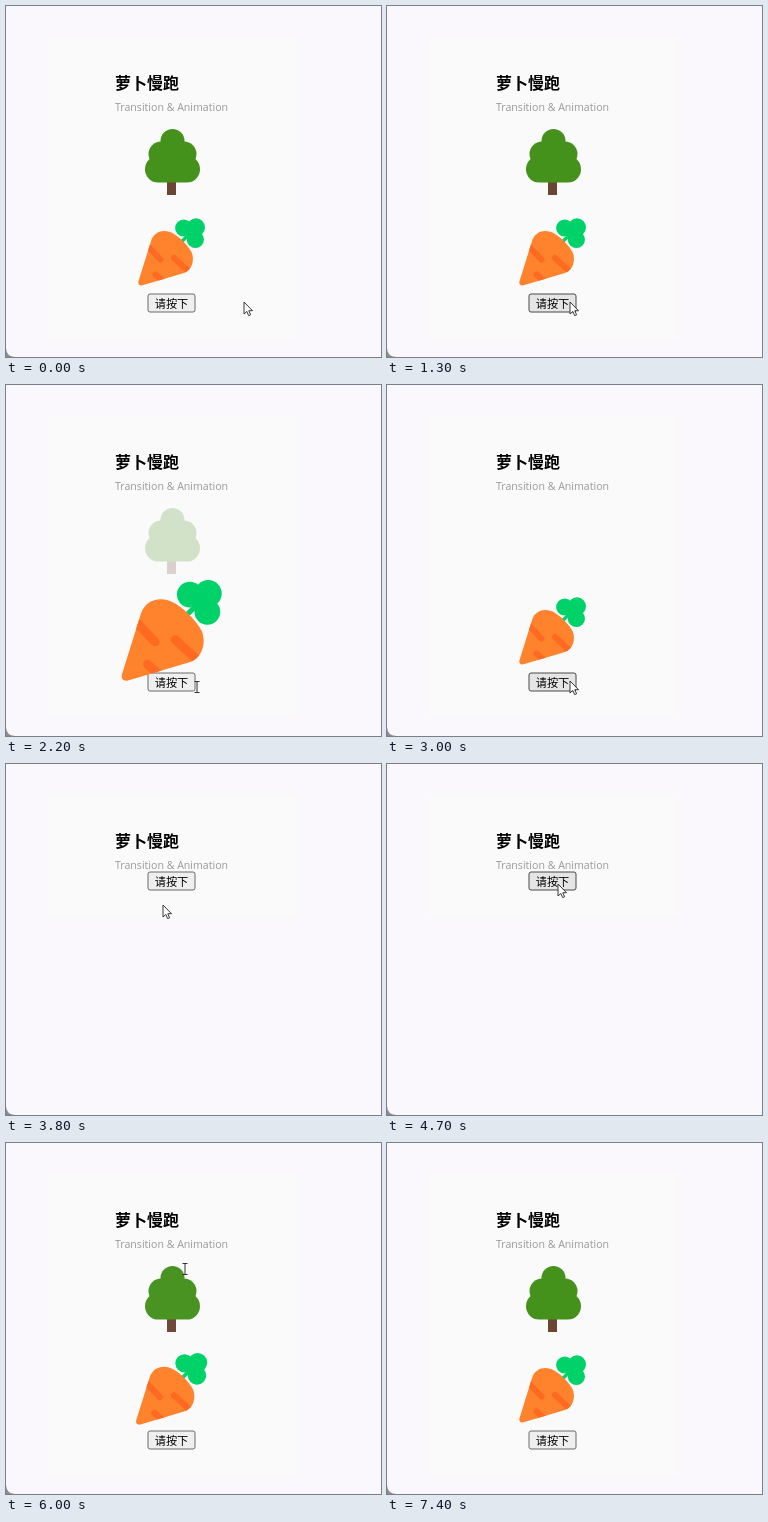
An HTML page for the animation above (8300 ms loop, 375 by 351 pixels).

```html
<!DOCTYPE html>
<html lang="zh-CN">
<head>
<meta charset="utf-8">
<title>萝卜慢跑</title>
<style>
  html, body { margin: 0; width: 100%; height: 100%; overflow: hidden; background: #faf8fd; }
  svg { display: block; width: 375px; height: 351px; }
  text { font-family: "Noto Sans CJK SC", "Noto Sans CJK", sans-serif; }
  .title { font-size: 16px; font-weight: 700; }
  .subtitle { font: 10.6px "Open Sans", sans-serif; fill: #999; }
  .label { font-size: 11.2px; }
  #frame { fill: #efefef; stroke: #6b6b6b; }
  #frame.hover { fill: #e5e5e5; stroke: #484848; }
</style>
</head>
<body>
<svg viewBox="0 0 375 351">
  <defs>
    <path id="body" d="M132.4 275.5L145.2 234.5C148.5 225 159 222.5 168 228C176 233 182 240 185.5 246C189 254 186 264 178 267L136.5 279.3C133.5 280 131.7 278 132.4 275.5Z"/>
    <clipPath id="inside"><use href="#body"/></clipPath>
  </defs>
  <rect id="card" x="42" y="30" width="249" height="303" fill="#fafafa"/>
  <path d="M0 342Q.5 350.5 9 351H0Z" fill="#8c8c8c"/>
  <text class="title" x="109" y="83">萝卜慢跑</text>
  <text class="subtitle" x="109" y="104.5">Transition &amp; Animation</text>

  <g id="tree">
    <rect x="161" y="174" width="9" height="15" fill="#6d4534"/>
    <g fill="#44911b">
      <circle cx="166.5" cy="135" r="12"/>
      <circle cx="155" cy="148" r="12.5"/>
      <circle cx="178" cy="148" r="12.5"/>
      <rect x="139" y="150" width="55" height="26.5" rx="13.2"/>
      <rect x="156" y="136" width="21" height="24"/>
    </g>
  </g>

  <g id="button">
    <rect id="frame" x="142" y="288" width="47" height="18" rx="2"/>
    <text class="label" x="148.7" y="301.6">请按下</text>
  </g>

  <g id="carrot">
    <g fill="#00d26a">
      <path d="M173.5 237.5L182 229.5" stroke="#00d26a" stroke-width="3.4"/>
      <circle cx="177.7" cy="222" r="8.6"/>
      <circle cx="190" cy="221.3" r="9"/>
      <circle cx="189.4" cy="233.5" r="8.6"/>
      <circle cx="184.5" cy="227.5" r="5"/>
    </g>
    <use href="#body" fill="#ff822d"/>
    <path clip-path="url(#inside)" d="M143 241.5L154.5 253.5M168 252L181.5 264.5M149.5 268.5L158 276"
      fill="none" stroke="#ff6a22" stroke-width="6" stroke-linecap="round"/>
  </g>

  <path id="arrow" d="M0 0V12L2.8 9.4L4.6 13.6L6.6 12.8L4.8 8.7H8.5Z" fill="#fff" stroke="#222" stroke-width=".9"/>
  <path id="beam" d="M-2.5 -5.5H2.5M0 -5.5V5.5M-2.5 5.5H2.5" fill="none" stroke="#333"/>
</svg>
<script>
const LOOP = 8300, DURATION = 1500;
const LEAVE = 1480, REMOVED = 3200, ENTER = 4820;
const LIFT = 180;

const refreshes = [0, 7, 8, 10, 11, 13, 16, 17, 19, 20, 22, 24, 25, 27, 28, 30, 32, 33, 35, 37,
  38, 40, 41, 43, 47, 49, 50, 52, 54, 55, 56, 58, 60, 61, 63, 65, 66, 74].map(n => n * 100);

// [time, x, y, shape]
const pointer = [
  [0, 238, 296, 'arrow'], [700, 208, 296, 'arrow'], [800, 188, 296, 'arrow'],
  [1000, 184, 293, 'arrow'], [1100, 180, 292, 'arrow'], [1300, 183, 296, 'arrow'],
  [1900, 191, 302, 'beam'], [2500, 190, 305, 'beam'], [2700, 183, 296, 'arrow'],
  [3500, 182, 251, 'arrow'], [3700, 170, 190, 'arrow'], [3800, 157, 141, 'arrow'],
  [4000, 160, 134, 'arrow'], [4100, 163, 128, 'arrow'], [4300, 176, 118, 'arrow'],
  [4700, 171, 120, 'arrow'], [4900, 173, 124, 'beam'], [5200, 179, 126, 'beam'],
  [6300, 273, 237, 'arrow'], [6500, 359, 266, 'arrow'], [6600, 400, 280, 'arrow'],
];

const $ = id => document.getElementById(id);
const clamp = v => Math.min(1, Math.max(0, v));

// CSS "ease": cubic-bezier(.25, .1, .25, 1)
function ease(x) {
  const bezier = (a, b, s) => 3 * a * s * (1 - s) ** 2 + 3 * b * s * s * (1 - s) + s ** 3;
  let low = 0, high = 1;
  for (let i = 0; i < 24; i++) {
    const mid = (low + high) / 2;
    if (bezier(.25, .25, mid) < x) low = mid; else high = mid;
  }
  return bezier(.1, 1, low);
}

// Grows to one and a half, then settles back, each half eased.
function bounce(p) {
  return p < .5 ? 1 + ease(p * 2) / 2 : 1.5 - ease(p * 2 - 1) / 2;
}

function draw(t) {
  const gone = t >= REMOVED && t < ENTER;
  const entering = t >= ENTER;
  const p = clamp((t - (entering ? ENTER : LEAVE)) / DURATION);
  const shift = gone ? LIFT : 0;

  $('tree').setAttribute('opacity', gone ? 0 : entering ? ease(p) : 1 - ease(p));
  $('carrot').setAttribute('visibility', gone ? 'hidden' : 'visible');
  $('carrot').setAttribute('transform', `translate(165.5 246.8) scale(${bounce(p)}) translate(-165.5 -246.8)`);
  $('button').setAttribute('transform', `translate(0 ${-shift})`);
  $('card').setAttribute('height', 303 - shift);

  const [, x, y, shape] = pointer.findLast(k => k[0] <= t);
  for (const id of ['arrow', 'beam']) {
    $(id).setAttribute('visibility', id === shape ? 'visible' : 'hidden');
    $(id).setAttribute('transform', `translate(${x} ${y})`);
  }
  const top = 288 - shift;
  $('frame').classList.toggle('hover', shape === 'arrow' && x > 142 && x < 187 && y > top && y < top + 18);
}

function tick() {
  const t = performance.now() % LOOP;
  draw(refreshes.findLast(r => r <= t));
  requestAnimationFrame(tick);
}
tick();
</script>
</body>
</html>
```
